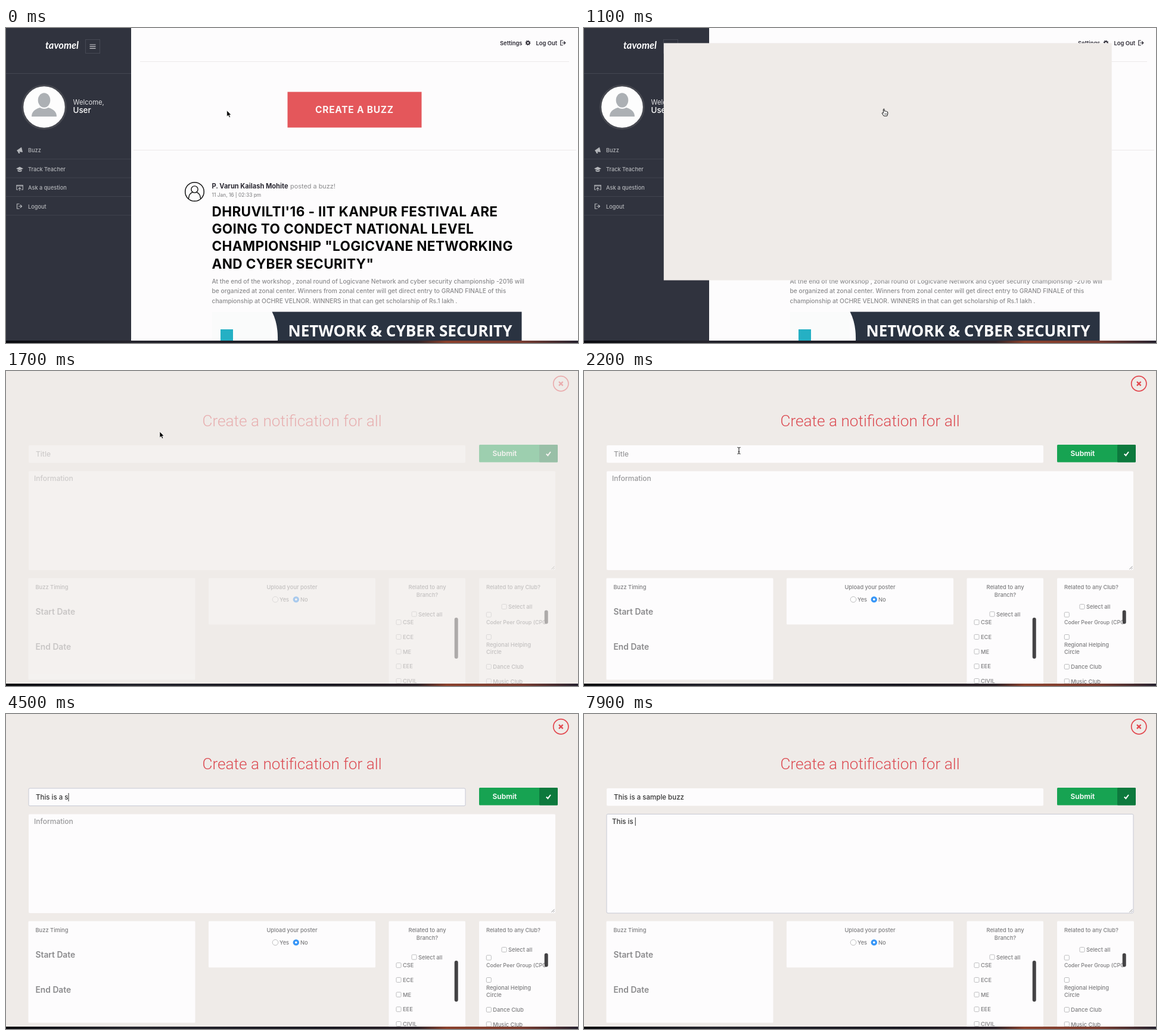
An HTML page that plays this animation: 960 by 530 pixels, repeating every 8 s.

```html
<!DOCTYPE html>
<html lang="en">
<head>
<meta charset="utf-8">
<title>Create a buzz</title>
<style>
html, body { margin: 0; width: 100%; height: 100%; overflow: hidden; background: #fdfcfd; }
svg { display: block; width: 960px; height: 530px; }
text { font-family: Inter, "Open Sans", sans-serif; white-space: pre; }
</style>
</head>
<body>
<svg viewBox="0 0 960 530">
  <defs>
    <linearGradient id="wallpaper">
      <stop offset="0" stop-color="#090a0f"/>
      <stop offset=".22" stop-color="#25252d"/>
      <stop offset=".56" stop-color="#191821"/>
      <stop offset=".72" stop-color="#2c2228"/>
      <stop offset=".77" stop-color="#8a402c"/>
      <stop offset=".9" stop-color="#7a3c30"/>
      <stop offset="1" stop-color="#25212e"/>
    </linearGradient>
  </defs>
  <g id="page"></g>
  <rect id="sheet"/>
  <g id="form"></g>
  <rect y="526" width="960" height="4" fill="url(#wallpaper)"/>
  <g id="arrow">
    <path d="M0 0V10.2L2.4 8L4 11.8L5.8 11L4.2 7.4H7.2Z" fill="#000" stroke="#fff" stroke-width=".7"/>
  </g>
  <g id="hand">
    <path d="M-2.6 5.5V.6Q-1.7-.6-.8.6V4Q.4 3.2 1.3 4.3Q2.5 3.6 3.2 4.8Q4.6 4.4 4.8 6V8.4L3.6 12H-1.8L-5 7.4Q-4.3 5.9-2.6 7.2Z" fill="#fff" stroke="#111" stroke-width="1" stroke-linejoin="round"/>
    <path d="M-.2 7.4V10M1.4 7.4V10M3 7.4V10" stroke="#111" stroke-width=".6"/>
  </g>
  <g id="beam">
    <path d="M-2.5-5.5Q0-5.5 0-4.2Q0-5.5 2.5-5.5M0-4.2V4.2M-2.5 5.5Q0 5.5 0 4.2Q0 5.5 2.5 5.5M-1.3 1.8H1.3" fill="none" stroke="#111" stroke-width="1"/>
  </g>
</svg>
<script>
const $ = id => document.getElementById(id);
const text = (x, y, size, fill, str, weight = 500, more = '') =>
  `<text x="${x}" y="${y}" font-size="${size}" fill="${fill}" font-weight="${weight}" ${more}>${str}</text>`;
const rect = (x, y, w, h, fill, more = '') =>
  `<rect x="${x}" y="${y}" width="${w}" height="${h}" fill="${fill}" ${more}/>`;
const circle = (x, y, r, fill, more = '') =>
  `<circle cx="${x}" cy="${y}" r="${r}" fill="${fill}" ${more}/>`;
const line = (d, stroke, width = 1, more = '') =>
  `<path d="${d}" fill="none" stroke="${stroke}" stroke-width="${width}" ${more}/>`;
const shape = (d, fill) => `<path d="${d}" fill="${fill}"/>`;
const middle = 'text-anchor="middle"';

// Page behind the form
const dim = '#b4b6ba', dark = '#2b2933', grey = '#8b8b8d';
const exitIcon = (x, y, c) =>
  line(`M${x + 4} ${y - 4}H${x}V${y + 4}H${x + 4}M${x + 2.5} ${y}H${x + 7.5}M${x + 5.5} ${y - 2.5}L${x + 8} ${y}L${x + 5.5} ${y + 2.5}`, c, 1.2);

const menu = ['Buzz', 'Track Teacher', 'Ask a question', 'Logout'].map((label, i) =>
  text(37, 209 + i * 31.5, 9.2, dim, label) +
  line(`M0 ${220.5 + i * 31.5}H210`, '#40434e')).join('');

const sidebar =
  rect(0, 0, 210, 526, '#30333e') +
  line('M0 76.5H210', '#454853') +
  text(66, 35, 16.5, '#fff', 'tavomel', 700, 'font-style="italic" style="font-family:Lato,sans-serif"') +
  rect(133.5, 19.5, 24, 23, 'none', 'stroke="#464954"') +
  line('M140.5 28H150.5M140.5 31.2H150.5M140.5 34.4H150.5', '#c9cacd', 1.2) +
  circle(64, 133, 36.3, '#fdfdfd', 'stroke="#464850" stroke-width="3"') +
  '<ellipse cx="64" cy="121.5" rx="10.3" ry="12.2" fill="#acb0b4"/>' +
  shape('M43 149Q43 138 57 134Q64 138 71 134Q85 138 85 149Z', '#acb0b4') +
  text(112.5, 128.5, 11.2, '#e2e2e4', 'Welcome,', 400) +
  text(112.5, 142.7, 13.4, '#fff', 'User') +
  menu +
  shape('M18 206L26 200.5L28 209L22.5 208.2L23.5 211H21L20 208.4Z', dim) +
  shape('M17 236.5L23 233.5L29 236.5L23 239.5ZM19.5 238.6L23 240.4L26.5 238.6V241Q23 243 19.5 241Z', dim) +
  line('M20.5 272H17.8V264.5H28.3V272H25.8M17.8 266H28.3M23 274V269M20.8 271L23 268.6L25.2 271', dim, 1.1) +
  exitIcon(18.5, 300, dim);

const heading = [
  "DHRUVILTI'16 - IIT KANPUR FESTIVAL ARE",
  'GOING TO CONDECT NATIONAL LEVEL',
  'CHAMPIONSHIP "LOGICVANE NETWORKING',
  'AND CYBER SECURITY"',
].map((s, i) => text(345.5, 317 + i * 29.2, 22.6, '#070707', s, 700, 'letter-spacing=".35"')).join('');

const story = [
  'At the end of the workshop , zonal round of Logicvane Network and cyber security championship -2016 will',
  'be organized at zonal center. Winners from zonal center will get direct entry to GRAND FINALE of this',
  'championship at OCHRE VELNOR. WINNERS in that can get scholarship of Rs.1 lakh .',
].map((s, i) => text(345.5, 429.5 + i * 16.5, 10.24, grey, s)).join('');

const poster =
  rect(346, 478, 100, 48, '#fafbfb') +
  shape('M446.5 477.5H865.5V526H456Q457 498 446.5 477.5Z', '#2a3341') +
  rect(360, 507, 21, 19, '#25b0c4') +
  text(473.5, 518.5, 26.1, '#fff', 'NETWORK &amp; CYBER SECURITY', 700, 'style="font-family:\'Open Sans\',sans-serif"');

$('page').innerHTML =
  rect(0, 0, 960, 530, '#fdfcfd') + sidebar +
  text(829, 28.5, 9.4, dark, 'Settings', 600) +
  circle(876, 25, 2.4, 'none', `stroke="${dark}" stroke-width="1.7"`) +
  circle(876, 25, 3.7, 'none', `stroke="${dark}" stroke-width="1.3" stroke-dasharray="1.45"`) +
  text(889.5, 28.5, 9.4, dark, 'Log Out', 600) +
  exitIcon(930.8, 25, dark) +
  line('M225 56.5H945M214 205.5H957', '#ece9ea') +
  rect(472.5, 107.5, 225, 60, '#e4575b') +
  text(519, 143, 15.5, '#fdf3f3', 'CREATE A BUZZ', 700, 'letter-spacing=".75"') +
  circle(316.5, 275.5, 15.8, 'none', 'stroke="#111" stroke-width="1.5"') +
  circle(316.5, 271.5, 5.6, 'none', 'stroke="#111" stroke-width="1.4"') +
  line('M306.5 287Q307 278.5 313 276.3M326.5 287Q326 278.5 320 276.3', '#111', 1.4) +
  text(345.5, 270, 11.1, dark, 'P. Varun Kailash Mohite', 700) +
  text(477, 270, 10.9, grey, 'posted a buzz!', 400) +
  text(345.5, 283.5, 8.35, grey, '11 Jan, 16 | 02:33 pm') +
  heading + story + poster;

// Form
const ink = '#7d7d7f';
const panel = (x, y, w, h) => rect(x, y, w, h, '#fdfcfd', 'rx="1.5"');
const box = (x, y) => rect(x - 4, y - 4, 8, 8, '#fff', 'rx="1.5" stroke="#b5b5b7" stroke-width=".9"');
const label = (x, y, s, more) => text(x, y, 9.3, ink, s, 500, more);
const option = (x, y, s) => box(x, y) + label(x + 7, y + 3.5, s);
const field = (id, x, y, w, h) => rect(x, y, w, h, '#fdfcfd', `id="${id}Box" rx="2"`);
const entry = (id, x, y) => text(x, y, 12, '#333', '', 500, `id="${id}Text"`) +
  line('', '#333', 1, `id="${id}Caret"`);

$('form').innerHTML =
  circle(931.3, 21.3, 12.6, 'none', 'stroke="#e2484f" stroke-width="1.7"') +
  line('M928 18L934.6 24.6M934.6 18L928 24.6', '#e2484f', 2.4) +
  text(480, 93, 26.2, '#dc4b52', 'Create a notification for all', 300, middle + ' style="font-family:Roboto,sans-serif"') +
  field('title', 38, 125, 733, 29.5) + entry('title', 50, 143.7) +
  rect(794, 124, 132, 29.5, '#17a352', 'rx="1.5"') + rect(895, 124, 31, 29.5, '#0d793d', 'rx="1.5"') +
  text(816.5, 143.3, 12, '#fff', 'Submit', 600) +
  line('M906.8 139.5L909.4 142.2L914 136', '#fff', 2) +
  field('info', 38, 168.5, 884, 166.5) + entry('info', 47, 185) +
  line('M915.5 333.5L920.5 328.5M918.5 333.5L920.5 331.5', '#777', .8) +
  panel(37.5, 348.5, 280, 171) + panel(340, 348.5, 280, 78) +
  panel(642.5, 348.5, 128.5, 180) + panel(794, 348.5, 129, 180) +
  label(49.5, 366.5, 'Buzz Timing') +
  text(49.5, 410, 13.8, '#8a8a8c', 'Start Date', 600) +
  text(49.5, 469, 13.8, '#8a8a8c', 'End Date', 600) +
  label(480, 366.5, 'Upload your poster', middle) +
  circle(452, 384.4, 4.8, '#fff', 'stroke="#b5b5b7" stroke-width=".9"') +
  label(459, 388, 'Yes') +
  circle(486.8, 384.4, 5.2, '#3796f7') + circle(486.8, 384.4, 1.8, '#fff') +
  label(494, 388, 'No') +
  label(707, 366.5, 'Related to any', middle) + label(707, 379.5, 'Branch?', middle) +
  option(685, 409, 'Select all') +
  ['CSE', 'ECE', 'ME', 'EEE', 'CIVIL'].map((s, i) => option(659, 422.7 + i * 24.7, s)).join('') +
  rect(752.7, 415, 6, 69, '#434244', 'rx="3"') +
  label(806, 366.5, 'Related to any Club?') +
  option(836, 396.5, 'Select all') +
  box(810.3, 410) + text(806, 426, 8.9, ink, 'Coder Peer Group (CPG') +
  box(810.3, 447.5) + label(806, 463.5, 'Regional Helping') + label(806, 476, 'Circle') +
  option(810.3, 497.5, 'Dance Club') + option(810.3, 522, 'Music Club') +
  rect(903.7, 402.5, 6, 23, '#434244', 'rx="3"');

// Motion
const clamp = p => Math.max(0, Math.min(1, p));
const span = (t, a, b) => clamp((t - a) / (b - a));
const mix = (a, b, k) => a + (b - a) * k;
const smooth = p => p * p * (3 - 2 * p);
const set = (el, attrs) => Object.entries(attrs).forEach(([k, v]) => el.setAttribute(k, v));

const fields = [
  { id: 'title', x: 50, y: 133, hint: 'Title', value: 'This is a sample buzz', focus: 2600, blur: 5700, start: 3400 },
  { id: 'info', x: 47, y: 174, hint: 'Information', value: 'This is a', focus: 5700, blur: 9000, start: 7100 },
];
const keyTime = 100;

function drawField(f, t) {
  const el = $(f.id + 'Text');
  const typed = f.value.slice(0, Math.max(0, Math.floor((t - f.start) / keyTime)));
  el.textContent = typed || f.hint;
  set(el, { fill: typed ? '#333' : '#98989a', 'font-size': typed ? 11.5 : 12 });
  const active = t >= f.focus && t < f.blur;
  const typing = t >= f.start + keyTime && t < f.start + keyTime * f.value.length + 300;
  const lit = typing || (t - f.focus) % 1000 < 500;
  const x = f.x + .5 + (typed ? el.getComputedTextLength() : 0);
  set($(f.id + 'Caret'), { d: active && lit ? `M${x} ${f.y}v14` : '' });
  set($(f.id + 'Box'), { stroke: active ? '#c6c8d4' : 'none' });
}

const path = [[0, 370.7, 138.8], [100, 370.7, 138.8], [850, 505, 136], [1150, 505, 136], [1550, 258, 102], [1850, 258, 102], [2150, 260, 134]];

function drawPointer(t) {
  let i = path.findIndex(p => p[0] > t);
  if (i < 0) i = path.length - 1;
  const a = path[i - 1], b = path[i], k = smooth(span(t, a[0], b[0]));
  const x = mix(a[1], b[1], k), y = mix(a[2], b[2], k);
  const overButton = x > 473 && y > 108 && t < 1250;
  const kind = overButton ? 'hand' : t > 1850 && y > 125 ? 'beam' : 'arrow';
  for (const id of ['arrow', 'hand', 'beam'])
    set($(id), { transform: `translate(${x} ${y})`, opacity: id === kind && t < 3500 ? 1 : 0 });
}

function draw(t) {
  const grow = 1 - (1 - span(t, 963, 1365)) ** 3;
  const left = mix(472.5, 0, grow), right = mix(697.5, 960, grow);
  const top = mix(107.5, -7, grow), bottom = mix(167.5, 526, grow);
  set($('sheet'), {
    x: left, y: top, width: right - left, height: bottom - top,
    fill: '#efebe8', opacity: span(t, 963, 1040),
  });
  set($('form'), { opacity: span(t, 1550, 1950) });
  fields.forEach(f => drawField(f, t));
  drawPointer(t);
}

function tick() {
  draw(performance.now() % 8000);
  requestAnimationFrame(tick);
}
tick();
</script>
</body>
</html>
```
